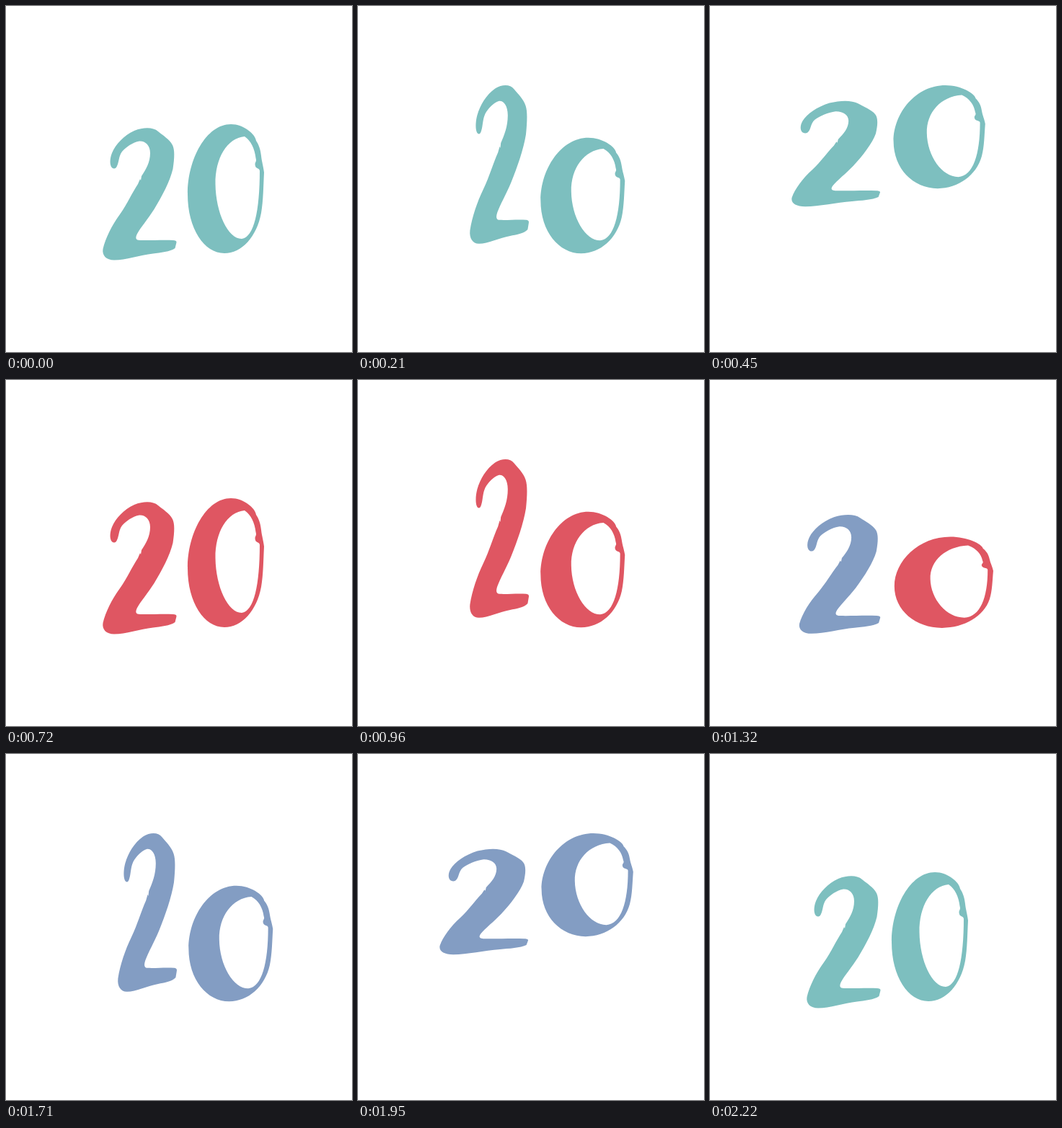
Write an HTML page that moves like this. It is 480 px wide and 480 px high and loops after 2250 ms.

```html
<!DOCTYPE html>
<html lang="en">
<head>
<meta charset="utf-8">
<title>Jumping 20</title>
<style>
  html, body { margin: 0; width: 100%; height: 100%; overflow: hidden; background: #fff; }
  svg { display: block; width: 100%; height: 100%; }
</style>
</head>
<body>
<svg viewBox="0 0 480 480">
  <path d="M150 225.500C144 225.500 143 214 147 204C152 192 163 180 178 173
    C191 168 204 168 211 174C217 179 227 185 231 193C234 199 234 210 231.500 226
    C227.500 243 216.500 264 205.500 282C196.500 296 187 307 182 316C179 322 180 325 186 325
    C200 325.500 218 324 232 325C237 325.500 237 327 236 330L234.500 336
    C228 341 214 342 204 343.500C186 345.500 166 352.500 150 352.500C139 352.500 133 346 134.500 337
    C138 322 147 304 158 289C168 275 175 259 183 247L186 240L187 242L188 236
    C194 227 200 217 200 204C200 193 193 187 185 187.500C176 189 166 196 161 202
    C156 209 157 216 154 222C153 224 152 225.500 150 225.500Z"/>
  <path fill-rule="evenodd" d="M312 164C278 164 252 212 252 261C252 309 275 343 303 343
    C327 343 348 320 354 287C357 270 357 250 358 231C357 222 355 217 354 208
    C353 199 351 193 347 187C346 178 330 164 312 164Z
    M331 181C307 183 290 211 290.500 247C291 287 308 323 327 323
    C344 321 352 284 352 229C352 224 346 227 345.500 220C345.500 216 348 216 346.500 211
    C345 198 340 187 331 181Z"/>
</svg>
<script>
const STEP = 30, CYCLE = 25, RECOLOR = 19;
const COLORS = ['#7dbfbf', '#df5662', '#839dc3'];
const ORIGIN = { x: 239, y: 346 };

const linear = t => t;
const smooth = t => t * t * (3 - 2 * t);
const easeIn = t => t * t;
const easeOut = t => 1 - (1 - t) ** 2;
const launch = t => t ** 1.4;

// Keys: [step, value, easing towards this key]
const SQUASH = [[0, 0], [4, .5, smooth], [7, -.2, launch], [14, .2, linear],
                [15, .2, linear], [16.8, .43, smooth], [20, 0, smooth]];
const LIFT = [[6, 0], [13.3, 94, easeOut], [16.9, 0, easeIn]];

function valueAt(keys, step) {
  const i = keys.findIndex(key => key[0] > step);
  if (i < 0) return keys[keys.length - 1][1];
  if (i === 0) return keys[0][1];
  const [from, a] = keys[i - 1], [to, b, ease] = keys[i];
  return a + (b - a) * ease((step - from) / (to - from));
}

const digits = document.querySelectorAll('path');

function draw(now) {
  const step = Math.floor(now / STEP + .01) % (CYCLE * COLORS.length);
  digits.forEach((digit, delay) => {
    const local = (step - delay + CYCLE) % CYCLE;
    const k = valueAt(SQUASH, local), lift = valueAt(LIFT, local);
    const color = Math.floor((step - delay - RECOLOR) / CYCLE) + 1;
    digit.setAttribute('fill', COLORS[Math.max(color, 0) % COLORS.length]);
    digit.setAttribute('transform',
      `translate(${ORIGIN.x} ${ORIGIN.y - lift}) scale(${1 + k} ${1 - k}) translate(${-ORIGIN.x} ${-ORIGIN.y})`);
  });
  requestAnimationFrame(draw);
}
draw(performance.now());
</script>
</body>
</html>
```
